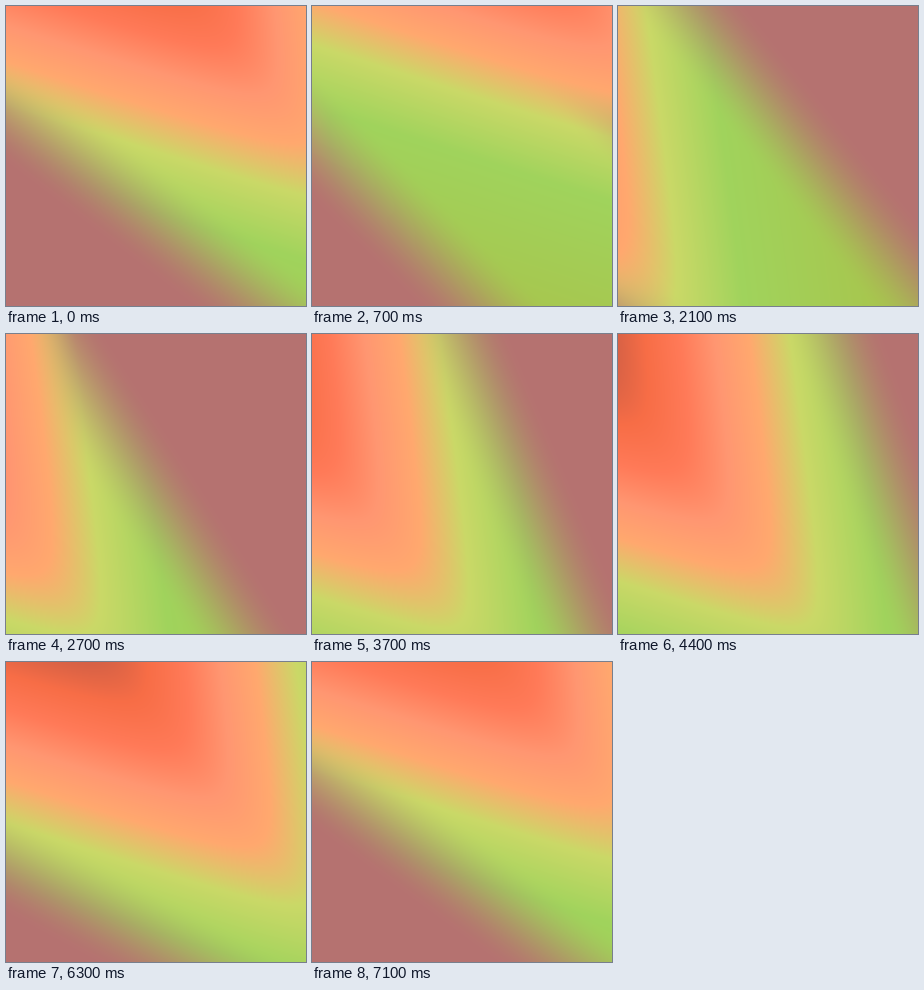
Recreate the animation shown at these times as an HTML page with a canvas. Size 300 by 300 pixels, loop 7.2 s.

```html
<!DOCTYPE html>
<html lang="en">
<head>
<meta charset="utf-8">
<title>Colour drift</title>
<style>
  html, body { margin: 0; width: 100%; height: 100%; overflow: hidden; background: #c09a6c; }
  canvas { display: block; width: 100vw; height: 100vh; }
</style>
</head>
<body>
<canvas id="stage" width="300" height="300"></canvas>
<script>
const SIZE = 300, MID = SIZE / 2, LOOP = 7.2, STEP = 0.1;

// Colour by distance from the edge of the warm wedge (negative is inside)
const ramp = [
  [-190, [160, 85, 80]],
  [-145, [202, 92, 68]],
  [-108, [247, 109, 70]],
  [-75, [255, 122, 88]],
  [-42, [255, 150, 113]],
  [-8, [255, 168, 110]],
  [32, [202, 216, 103]],
  [90, [160, 211, 92]],
  [220, [167, 198, 78]]
];
const mauve = [181, 114, 112];

const clamp = v => Math.min(1, Math.max(0, v));
const smooth = (a, b, v) => {
  const u = clamp((v - a) / (b - a));
  return u * u * (3 - 2 * u);
};
const mix = (a, b, u) => a + (b - a) * u;
const softMax = (a, b, k) => (a + b + Math.hypot(a - b, k)) / 2;
const softMin = (a, b, k) => -softMax(-a, -b, k);

function rampColor(d) {
  let i = 1;
  while (i < ramp.length - 1 && ramp[i][0] < d) i++;
  const [from, c0] = ramp[i - 1], [to, c1] = ramp[i];
  const u = clamp((d - from) / (to - from));
  return c0.map((c, j) => mix(c, c1[j], u));
}

const LOW = -400, HIGH = 400;
const shades = Array.from({ length: HIGH - LOW + 1 }, (_, i) => rampColor(i + LOW));

// Signed distance to a line, given its normal and its distance from the middle
function line(degrees, offset) {
  const a = degrees * Math.PI / 180, nx = Math.cos(a), ny = Math.sin(a);
  return (x, y) => (x - MID) * nx + (y - MID) * ny - offset;
}

// The wedge's side sweeps right while its floor accelerates upwards
function wedge(age) {
  const lift = age - 3.7;
  const side = line(-8, 62 * (age - 2.2) - 125);
  const floor = line(108, 0.95 * (130 - 16 * lift - 9 * lift * Math.abs(lift)));
  return (x, y) => softMax(side(x, y), floor(x, y), 45);
}

// A mauve patch slides in, comes closest at its peak time and slides out
function patch(t, peak, degrees, nearest) {
  let dt = (t - peak) % LOOP;
  if (dt > LOOP / 2) dt -= LOOP;
  if (dt < -LOOP / 2) dt += LOOP;
  const turn = 13 * Math.sin(2 * Math.PI * dt / LOOP);
  return line(degrees + turn, Math.hypot(82 * dt, 15) + nearest);
}

const ctx = document.getElementById('stage').getContext('2d');
const image = ctx.createImageData(SIZE, SIZE);

function draw(t) {
  const entering = wedge(t), leaving = wedge(t + LOOP);
  const right = patch(t, 2.75, -32, -32);
  const left = patch(t, 7.25, 128, 28);
  let p = 0;
  for (let y = 0; y < SIZE; y++) {
    for (let x = 0; x < SIZE; x++) {
      const d = softMin(entering(x, y), leaving(x, y), 10);
      const m = Math.max(right(x, y), left(x, y));
      const cover = smooth(-40, 55, m) * smooth(-12, 38, d);
      const at = Math.min(HIGH - 1, Math.max(LOW, d)) - LOW;
      const i = Math.floor(at), c0 = shades[i], c1 = shades[i + 1];
      for (let j = 0; j < 3; j++) {
        image.data[p++] = mix(mix(c0[j], c1[j], at - i), mauve[j], cover);
      }
      image.data[p++] = 255;
    }
  }
  ctx.putImageData(image, 0, 0);
}

const start = performance.now();
let shown = -1;
function tick() {
  const elapsed = Math.max(0, performance.now() - start) % (LOOP * 1000);
  const step = Math.floor(elapsed / (STEP * 1000));
  if (step !== shown) {
    draw(step * STEP);
    shown = step;
  }
  requestAnimationFrame(tick);
}
tick();
</script>
</body>
</html>
```
